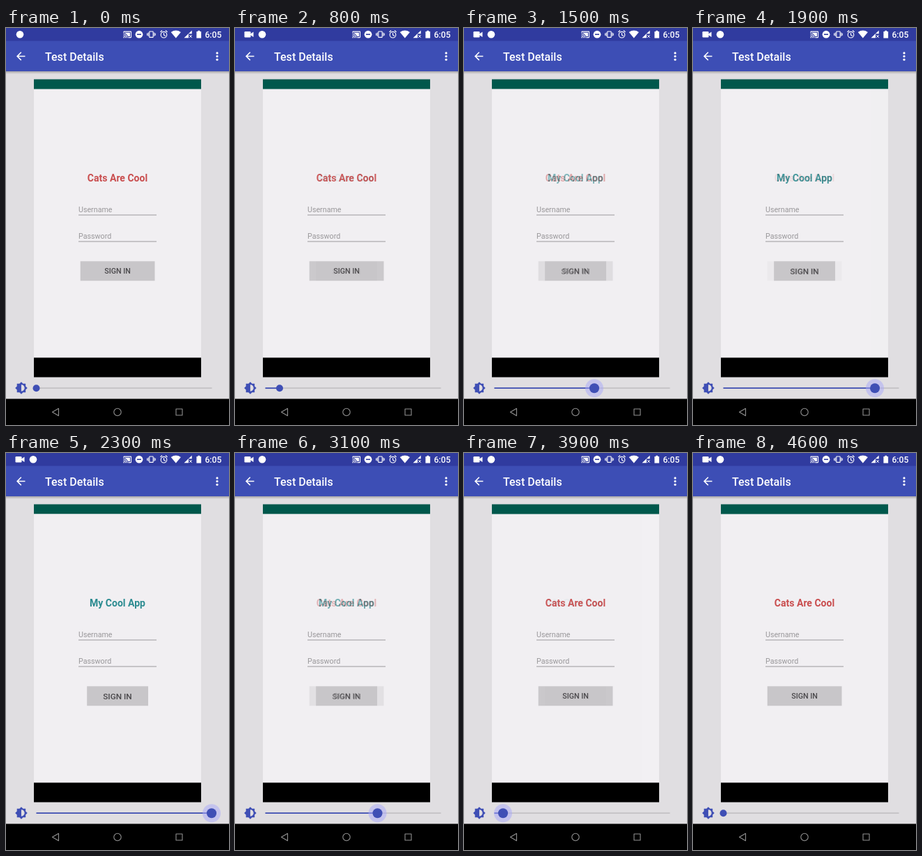
Recreate the animation shown at these times as an HTML page. Size 320 by 569 pixels, loop 4700 ms.

```html
<!DOCTYPE html>
<html lang="en">
<head>
<meta charset="utf-8">
<title>Test Details</title>
<style>
  html, body { margin: 0; width: 100%; height: 100%; overflow: hidden; background: #e0dee1; }
  svg { display: block; width: 100%; height: 100%; }
  text { font-family: Roboto, sans-serif; }
  .mid { text-anchor: middle; }
  .medium { font-weight: 500; }
  .heading { font-size: 14px; font-weight: 700; }
  .hint { font-size: 10.7px; fill: #99979a; }
  .line { stroke: #9b999c; stroke-width: 1; }
  .button { fill: #c8c6c9; }
  .nav { fill: none; stroke: #919191; stroke-width: 1.1; stroke-linejoin: round; }
</style>
</head>
<body>
<svg viewBox="0 0 320 569" preserveAspectRatio="none">
  <defs>
    <linearGradient id="shade" x2="0" y2="1">
      <stop offset="0" stop-color="#000" stop-opacity=".26"/>
      <stop offset="1" stop-color="#000" stop-opacity="0"/>
    </linearGradient>
    <g id="form">
      <rect x="40" y="87.5" width="240" height="385" fill="#f1eff2"/>
      <text class="hint" x="104" y="263.8">Username</text>
      <path class="line" d="M104 268H216"/>
      <text class="hint" x="104" y="301.8">Password</text>
      <path class="line" d="M104 306H216"/>
    </g>
  </defs>

  <rect width="320" height="569" fill="#e0dee1"/>
  <rect y="62" width="320" height="4" fill="url(#shade)"/>
  <rect y="18" width="320" height="44" fill="#3d4eb5"/>
  <rect width="320" height="18.5" fill="#303b9f"/>

  <!-- Status bar -->
  <g fill="#fff">
    <g id="camera">
      <rect x="13.5" y="5" width="9" height="8.5" rx="1.2"/>
      <path d="M22 8.6L26.5 5.4V13L22 9.9Z"/>
    </g>
    <circle id="notice" cx="20" cy="9.2" r="5.3"/>
    <path transform="translate(167.9 3) scale(.53)" d="M1 18v3h3c0-1.66-1.34-3-3-3zm0-4v2c2.76 0 5 2.24 5 5h2c0-3.87-3.13-7-7-7zm18-7H5v1.63c3.96 1.28 7.09 4.41 8.37 8.37H19V7zM1 10v2c4.97 0 9 4.03 9 9h2c0-6.08-4.93-11-11-11zm20-7H3c-1.1 0-2 .9-2 2v3h2V5h18v14h-7v2h7c1.1 0 2-.9 2-2V5c0-1.1-.9-2-2-2z"/>
    <circle cx="191" cy="9.2" r="5.4"/>
    <rect x="188" y="8.4" width="6" height="1.6" fill="#303b9f"/>
    <path transform="translate(202.1 2.8) scale(.53)" d="M0 15h2V9H0zM3 17h2V7H3zM22 9v6h2V9zM19 17h2V7h-2zM16.5 3h-9Q6 3 6 4.5v15Q6 21 7.5 21h9q1.5 0 1.5-1.5v-15Q18 3 16.5 3zM16 19H8V5h8z"/>
    <g fill="none" stroke="#fff" stroke-width="1.15">
      <circle cx="226.5" cy="9.7" r="4.3"/>
      <path d="M226.5 7V10L229 11.4M221.4 5.8L224.1 3.5M231.6 5.8L228.9 3.5"/>
    </g>
    <path d="M243.8 14.6L236.7 5.9Q243.8 1.2 250.9 5.9Z"/>
    <path d="M255.5 14.3L266.7 3.4V8.3H262V14.3Z"/>
    <path d="M263.2 10L266.7 13.8M266.7 10L263.2 13.8" stroke="#fff" stroke-width="1"/>
    <path d="M273.4 5H275.3V3.7H278.2V5H280.1V14.4H273.4Z"/>
    <text class="medium" x="285.5" y="13.6" font-size="12.1">6:05</text>
  </g>

  <!-- Toolbar -->
  <path transform="translate(11.9 31.1) scale(.778)" fill="#fff" d="M20 11H7.83l5.59-5.59L12 4l-8 8 8 8 1.41-1.41L7.83 13H20z"/>
  <text class="medium" x="56" y="46.6" font-size="16" fill="#fff">Test Details</text>
  <g fill="#fff">
    <circle cx="303" cy="35.9" r="1.6"/>
    <circle cx="303" cy="40.6" r="1.6"/>
    <circle cx="303" cy="45.3" r="1.6"/>
  </g>

  <!-- Compared screens -->
  <rect x="40" y="73.5" width="240" height="14.5" fill="#00584c"/>
  <g>
    <use href="#form"/>
    <text class="heading mid" x="160" y="219.6" fill="#c94d4e">Cats Are Cool</text>
    <rect class="button" x="106.7" y="334.3" width="106.8" height="28"/>
    <text class="medium mid" x="160" y="352.4" font-size="10.7" fill="#4a484b">SIGN IN</text>
  </g>
  <g id="overlay">
    <use href="#form"/>
    <text class="heading mid" x="160" y="219.6" fill="#2b8b90">My Cool App</text>
    <rect class="button" x="116.2" y="334.3" width="87.8" height="28"/>
    <text class="medium mid" x="160" y="352.8" font-size="11.8" fill="#4a484b">SIGN IN</text>
  </g>
  <rect x="40" y="472.5" width="240" height="28" fill="#000"/>

  <!-- Opacity slider -->
  <path transform="translate(12.6 506.7) scale(.778)" fill="#3f4fb5" d="M20 15.31L23.31 12 20 8.69V4h-4.69L12 .69 8.69 4H4v4.69L.69 12 4 15.31V20h4.69L12 23.31 15.31 20H20zM12 18V6c3.31 0 6 2.69 6 6s-2.69 6-6 6z"/>
  <path d="M43.5 516.2H295.5" stroke="#c3c1c5" stroke-width="1.7"/>
  <path id="track" stroke="#3f4fb5" stroke-width="1.8"/>
  <circle id="halo" cy="516.2" fill="#a8a8fa"/>
  <circle id="thumb" cy="516.2" fill="#3f4fb5"/>

  <!-- Navigation bar -->
  <rect y="531.5" width="320" height="37.5" fill="#000"/>
  <g class="nav">
    <path d="M75.5 545.3V555.7L66.5 550.5Z"/>
    <circle cx="160" cy="550.5" r="5.2"/>
    <rect x="244" y="546" width="9" height="9"/>
  </g>
</svg>

<script>
  const LOOP = 4700, STEP = 100, MIN = 43.5, MAX = 295;
  const el = id => document.getElementById(id);
  const set = (id, attrs) => {
    for (const name in attrs) el(id).setAttribute(name, attrs[name]);
  };

  // [time, value] tables
  const position = [[700, MIN], [800, 64], [1500, 187], [1900, 261], [2100, 288], [2300, MAX],
    [2700, MAX], [2800, 286], [3100, 204.5], [3500, 141.5], [3900, 56], [4000, MIN]];
  const radius = [[800, 5], [1000, 7], [4200, 7], [4500, 5]];
  const haloSize = [[800, 5], [1000, 13]];
  const haloAlpha = [[800, 0], [900, .5], [4200, .5], [4600, 0]];
  const recording = [[0, 0], [300, 1]];

  function at(table, t) {
    const next = table.findIndex(([time]) => time > t);
    if (next === 0) return table[0][1];
    if (next < 0) return table[table.length - 1][1];
    const [t0, v0] = table[next - 1], [t1, v1] = table[next];
    return v0 + (v1 - v0) * (t - t0) / (t1 - t0);
  }

  function draw(t) {
    const x = at(position, t), rec = at(recording, t);
    set('overlay', { opacity: (x - MIN) / (MAX - MIN) });
    set('track', { d: `M${MIN} 516.2H${x}` });
    set('halo', { cx: x, r: at(haloSize, t), opacity: at(haloAlpha, t) });
    set('thumb', { cx: x, r: at(radius, t) });
    set('camera', { opacity: rec });
    set('notice', { cx: 20 + 19 * rec });
  }

  const start = performance.now();
  function tick() {
    const t = (performance.now() - start) % LOOP;
    draw(Math.floor(t / STEP) * STEP);
    requestAnimationFrame(tick);
  }
  tick();
</script>
</body>
</html>
```
